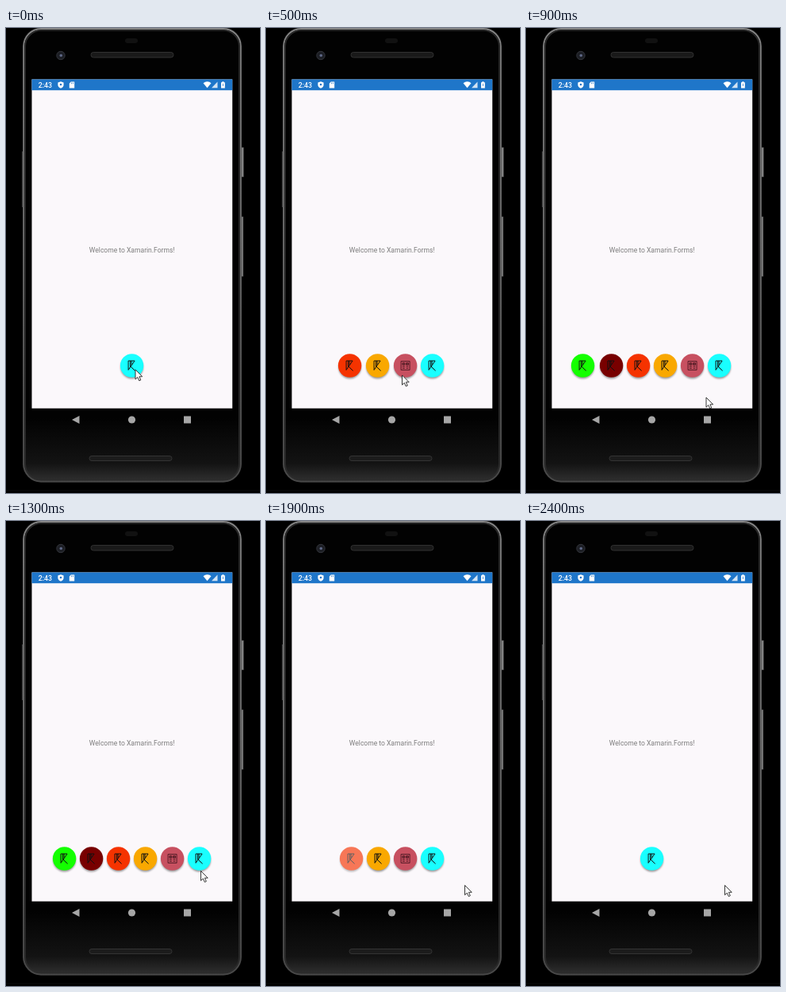
These frames come from a looping animation (320 by 584 pixels, 2.5 s). An HTML page:

```html
<!DOCTYPE html>
<html lang="en">
<head>
<meta charset="utf-8">
<title>Expanding buttons</title>
<style>
html, body { margin: 0; width: 100%; height: 100%; overflow: hidden; background: #000; }
svg { display: block; }
text { font-family: Roboto, Arial, sans-serif; }
</style>
</head>
<body>
<svg width="320" height="584" viewBox="0 0 320 584">
  <defs>
    <linearGradient id="rim" x2="0" y2="1">
      <stop offset="0" stop-color="#858585"/>
      <stop offset=".5" stop-color="#707070"/>
      <stop offset="1" stop-color="#484848"/>
    </linearGradient>
    <linearGradient id="body" x2="0" y2="1">
      <stop offset=".86" stop-color="#020202"/>
      <stop offset=".96" stop-color="#131313"/>
      <stop offset="1" stop-color="#303030"/>
    </linearGradient>
    <filter id="soft" x="-30%" y="-30%" width="160%" height="160%"><feGaussianBlur stdDeviation="1.3"/></filter>
    <g id="flag" fill="none" stroke="#111">
      <path d="M-4.5 5.5V-6H3.5L-4.5 5.5M-2-6V1.5M-.5-6V-.5M-1.5 1.2L4 6.5"/>
    </g>
    <g id="page" fill="none" stroke="#4b1822" stroke-width=".9">
      <path d="M-5.5-5.5H5.5V5.5H-5.5Z"/>
      <path d="M-3.6-3.4H-.8V-.8H-3.6ZM1-3.4H3.8V-.8H1Z" fill="#4b1822" fill-opacity=".5"/>
      <path d="M-3.7 1.3H-.7M1 1.3H3.7M-3.7 3.4H-.7M1 3.4H3.7"/>
    </g>
  </defs>

  <!-- phone -->
  <rect width="320" height="584"/>
  <path d="M0 581H320" stroke="#0c0c0c"/>
  <path d="M296.5 150h2.8v37h-2.8zM296.5 237h2.3v75h-2.3z" fill="#858585" stroke="#444" stroke-width=".6"/>
  <path d="M20.5 155v70" stroke="#444"/>
  <rect x="21" y="-.5" width="276" height="571" rx="23" fill="#2a2a2a"/>
  <rect x="22.3" y="1" width="273.4" height="568.5" rx="22" fill="url(#body)" stroke="url(#rim)" stroke-width="1.8"/>
  <rect x="24.2" y="3" width="269.6" height="564.5" rx="20" fill="none" stroke="#2b2b2b" stroke-width="1.6"/>
  <rect x="150" y="13" width="16" height="6" rx="3" fill="#111"/>
  <rect x="107" y="30.5" width="104" height="6.5" rx="3.2" fill="#191919" stroke="#303030"/>
  <rect x="105" y="537.5" width="104" height="6" rx="3" fill="#1c1c1c" stroke="#333"/>
  <circle cx="69" cy="34.5" r="5.2" fill="#1c1e24" stroke="#33353b"/>
  <circle cx="69.3" cy="34.5" r="1.8" fill="#5d6684"/>

  <!-- screen -->
  <rect x="32.5" y="64.5" width="252.7" height="413.2" fill="#fbf8fb"/>
  <rect x="32.5" y="64.5" width="252.7" height="13.7" fill="#1f76c9"/>
  <g fill="#fff">
    <text x="40.7" y="74.8" font-size="8.8" font-weight="500">2:43</text>
    <path d="M69 67.3l3.6 1.3v2.7q0 3-3.6 4.5q-3.6-1.5-3.6-4.5v-2.7z"/>
    <path d="M81.8 67.5h4.4v8h-6.4v-5.8z"/>
    <path d="M248.5 69.2q5-3.8 10 0l-5 6z"/>
    <path d="M266.5 67.5v7.7h-7.5z" opacity=".8"/>
    <path d="M271 68.3h1.4v-1h2v1h1.4v7.2H271z"/>
  </g>
  <circle cx="69" cy="71" r="1.3" fill="#1f76c9"/>
  <path d="M82.5 68.5v1.7M84.5 68.5v1.7M273.4 69.8v3.2" stroke="#1f76c9" stroke-width=".8"/>
  <text x="158.7" y="281.6" font-size="8.54" fill="#7d7d7d" text-anchor="middle">Welcome to Xamarin.Forms!</text>
  <g fill="#a6a6a6">
    <path d="M92.5 487v10L83 492z"/>
    <circle cx="158.5" cy="492" r="4.6"/>
    <rect x="224" y="487.5" width="9" height="9"/>
  </g>

  <g id="row"></g>
  <path id="cursor" d="M0 0V12.2L2.8 9.6L4.8 14L6.8 13.1L4.9 8.8H8.7Z" fill="#fff" stroke="#222" stroke-width=".9"/>
</svg>
<script>
const LOOP = 2500, STEP = 100;
// right to left: colour, time shown, time hidden
const buttons = [
  ['#19ffff', 0, LOOP + STEP],
  ['#c75060', 100, 2400],
  ['#f9a800', 300, 2200],
  ['#f53300', 400, 2000],
  ['#780000', 600, 1900],
  ['#14ff00', 800, 1700],
].map(([color, start, end], i) => ({ color, start, end, icon: i === 1 ? 'page' : 'flag' }));

// time, x, y
const path = [
  [0, 163, 429], [400, 171.5, 436], [500, 171.5, 436], [600, 180, 442],
  [900, 227, 464], [1000, 227, 464], [1200, 241, 458], [1300, 245.5, 439.5],
  [1500, 245.5, 440], [1700, 250.5, 457.5], [LOOP, 250.5, 457.5],
];

const row = document.getElementById('row');
const cursor = document.getElementById('cursor');

row.innerHTML = buttons.map(b => `<g>
  <circle cy="2.2" r="14.3" opacity=".4" filter="url(#soft)"/>
  <circle class="face" r="14.7" fill="${b.color}"/>
  <use href="#${b.icon}"/></g>`).join('');
buttons.forEach((b, i) => { b.node = row.children[i]; });
const mainFace = row.querySelector('.face');

function place(node, x, y) {
  node.setAttribute('transform', `translate(${x} ${y})`);
}

function cursorAt(t) {
  const i = path.findIndex(p => p[0] > t);
  const [t0, x0, y0] = path[i - 1], [t1, x1, y1] = path[i];
  const k = (t - t0) / (t1 - t0);
  return [x0 + (x1 - x0) * k, y0 + (y1 - y0) * k];
}

function draw(t) {
  const isShown = b => t >= b.start && t < b.end;
  const count = buttons.filter(isShown).length;
  buttons.forEach((b, i) => {
    b.node.style.display = isShown(b) ? '' : 'none';
    // a new button settles from slightly too far left
    const overshoot = i ? 2 * Math.min(1, Math.max(0, (b.start + 300 - t) / 200)) : 0;
    place(b.node, 158.6 + 17 * (count - 1) - 34 * i - overshoot, 424);
    b.node.style.opacity = b.end - t <= STEP ? 0.65 : 1;
  });
  const pressed = t >= 1600 && t < 1800;
  mainFace.setAttribute('fill', pressed ? '#5a9f98' : buttons[0].color);
  place(cursor, ...cursorAt(t));
}

const begin = performance.now();
function tick() {
  const t = (performance.now() - begin) % LOOP;
  draw(Math.floor(t / STEP) * STEP);
  requestAnimationFrame(tick);
}
tick();
</script>
</body>
</html>
```
